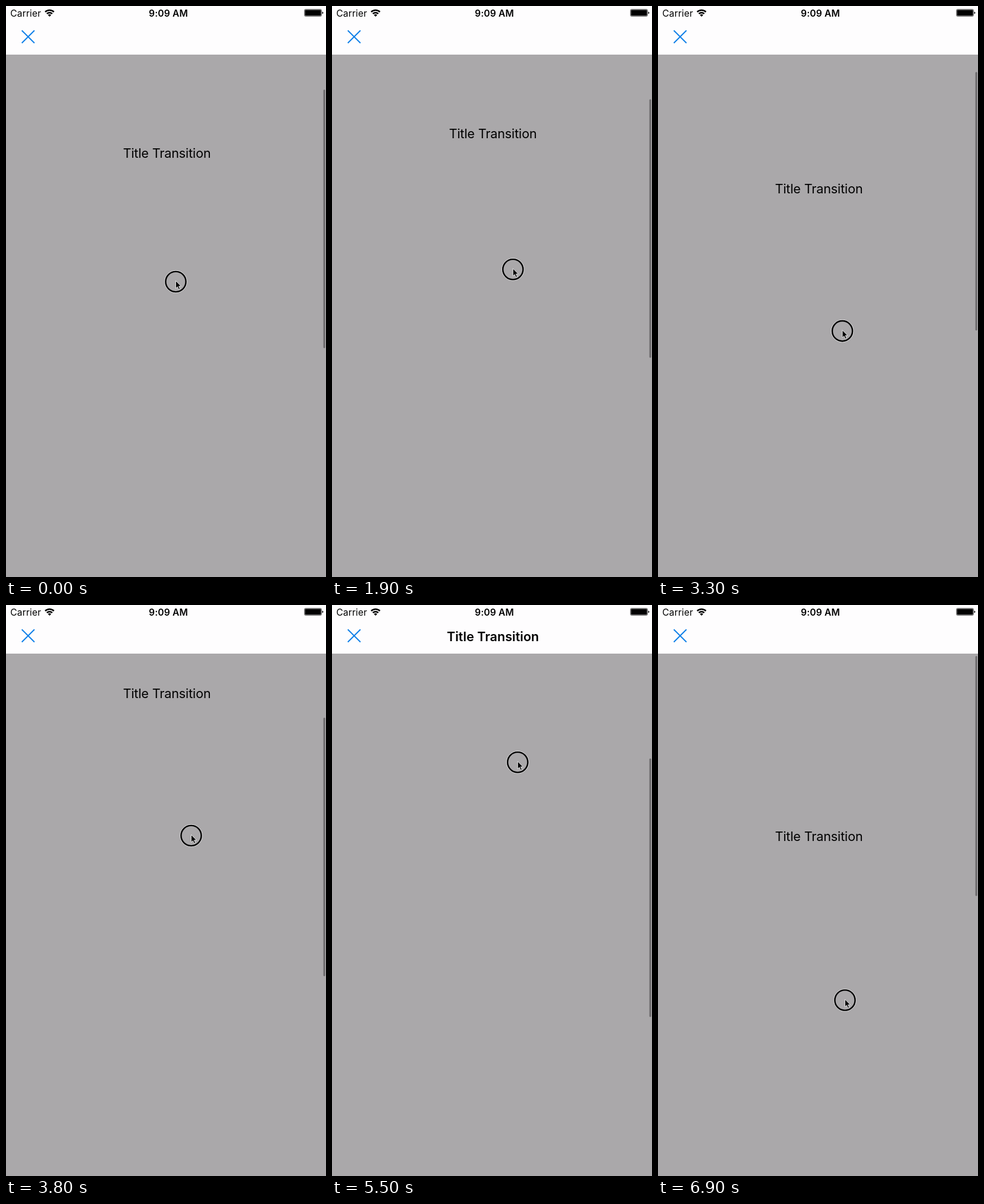
Animation of 540x963 px, one loop 7 s. Source, as an HTML page:

```html
<!DOCTYPE html>
<html lang="en">
<head>
<meta charset="utf-8">
<title>Title Transition</title>
<style>
  html, body { margin: 0; width: 100%; height: 100%; overflow: hidden; background: #aaa8aa; }
  svg { display: block; width: 100%; height: 100%; }
  text { font-family: Inter, Roboto, sans-serif; font-optical-sizing: none; fill: #000; }
  .title { font-size: 21.6px; letter-spacing: -.15px; text-anchor: middle; }
  .status { font-size: 15.6px; letter-spacing: .15px; }
  .bold { font-weight: 600; }
  .title.bold { letter-spacing: 0; }
</style>
</head>
<body>
<svg viewBox="0 0 540 963">
  <clipPath id="navClip"><rect width="540" height="82"/></clipPath>
  <clipPath id="wedge"><path d="M73.5 18L61.5 5H85.5Z"/></clipPath>
  <rect width="540" height="963" fill="#aaa8aa"/>
  <text id="bodyTitle" class="title" x="271.5">Title Transition</text>

  <g clip-path="url(#navClip)">
    <rect width="540" height="82" fill="#fefdfe"/>
    <text id="navTitle" class="title bold" x="271.5">Title Transition</text>

    <text class="status" x="7.2" y="17.7">Carrier</text>
    <g clip-path="url(#wedge)" fill="none" stroke="#000" stroke-width="2.6">
      <circle cx="73.5" cy="17.7" r="10.7"/>
      <circle cx="73.5" cy="17.7" r="6.5"/>
      <circle cx="73.5" cy="17.7" r="2.3" fill="#000"/>
    </g>
    <text class="status bold" x="274" y="17.7" text-anchor="middle">9:09 AM</text>
    <rect x="503.5" y="5.5" width="29" height="12" rx="2" fill="none" stroke="#000" stroke-opacity=".55"/>
    <rect x="504.4" y="6.4" width="27.2" height="10.2" rx="1"/>
    <path d="M533.6 9.6Q535.4 10 535.4 11.6T533.6 13.6Z"/>

    <path d="M26.7 41.2L48 62.5M48 41.2L26.7 62.5" fill="none" stroke="#1080e8" stroke-width="2"/>
  </g>

  <rect id="bar" x="535.6" width="3" rx="1.5" fill="#6b696b"/>
  <g id="pointer">
    <circle r="18.7" fill="none" stroke="#fff" stroke-opacity=".7"/>
    <circle r="17.1" fill="none" stroke="#000" stroke-width="2.4"/>
    <path d="M0-1.5V11.2L2.9 8.5L5 13.2L7.2 12.2L5.1 7.7H9Z" stroke="#fff" stroke-opacity=".8"/>
  </g>
</svg>
<script>
const LOOP = 7000, STEP = 100;
const REST = 359, BAND = .62;         // resting title centre, pull resistance
const BAR_TOP = 86, BAR_LEN = 436, BAR_RATE = .495;
const NAV_Y = 53, NAV_LAG = 12, BASELINE = 8;

// Turning points of the finger: time, x, y
const path = [
  [0, 286.5, 465], [1000, 299.5, 242], [1300, 301.5, 193],
  [2450, 308, 667], [2700, 308.5, 668], [3800, 312.5, 389],
  [4700, 312.5, 150], [4900, 312.5, 101], [5600, 313.5, 297],
  [6200, 314.5, 470], [6450, 315.2, 664], [6900, 315.5, 666.5]
];

const el = id => document.getElementById(id);
const bodyTitle = el('bodyTitle'), navTitle = el('navTitle');
const bar = el('bar'), pointer = el('pointer');
const ramp = (t, from, to) => Math.min(1, Math.max(0, (t - from) / (to - from)));

function slope(i, c) {
  const j = Math.min(path.length - 2, Math.max(0, i));
  return (path[j + 1][c] - path[j][c]) / (path[j + 1][0] - path[j][0]);
}

// Harmonic mean of both slopes, flat where the finger turns
function tangent(i, c) {
  const a = slope(i - 1, c), b = slope(i, c);
  return a * b > 0 ? 2 * a * b / (a + b) : 0;
}

function finger(t, c) {
  const i = path.findLastIndex((p, k) => p[0] <= t && k < path.length - 1);
  const p = path[i], q = path[i + 1];
  const h = q[0] - p[0], u = ramp(t, p[0], q[0]), v = 1 - u;
  return v * v * (1 + 2 * u) * p[c] + u * u * (3 - 2 * u) * q[c]
    + h * u * v * (v * tangent(i, c) - u * tangent(i + 1, c));
}

function draw(ms) {
  const t = Math.floor(ms % LOOP / STEP) * STEP;
  const x = finger(t, 1), y = finger(t, 2);

  // The title hangs above the finger and slips a little on each pull down
  const gap = 217 + 23 * ramp(t, 1300, 2450) + 17 * ramp(t, 4700, 5600);
  const scroll = y - gap - REST;
  const pull = Math.max(0, scroll) * BAND;
  const title = Math.round(REST + Math.min(0, scroll) + pull);

  bodyTitle.setAttribute('y', title + BASELINE);
  navTitle.setAttribute('y', Math.max(NAV_Y, title + NAV_LAG) + BASELINE);
  bar.setAttribute('y', BAR_TOP + Math.max(0, -scroll) * BAR_RATE);
  bar.setAttribute('height', BAR_LEN - pull);
  pointer.setAttribute('transform', `translate(${x} ${y})`);
}

let start;
function tick(now) {
  start ??= now;
  draw(now - start);
  requestAnimationFrame(tick);
}
draw(0);
requestAnimationFrame(tick);
</script>
</body>
</html>
```
